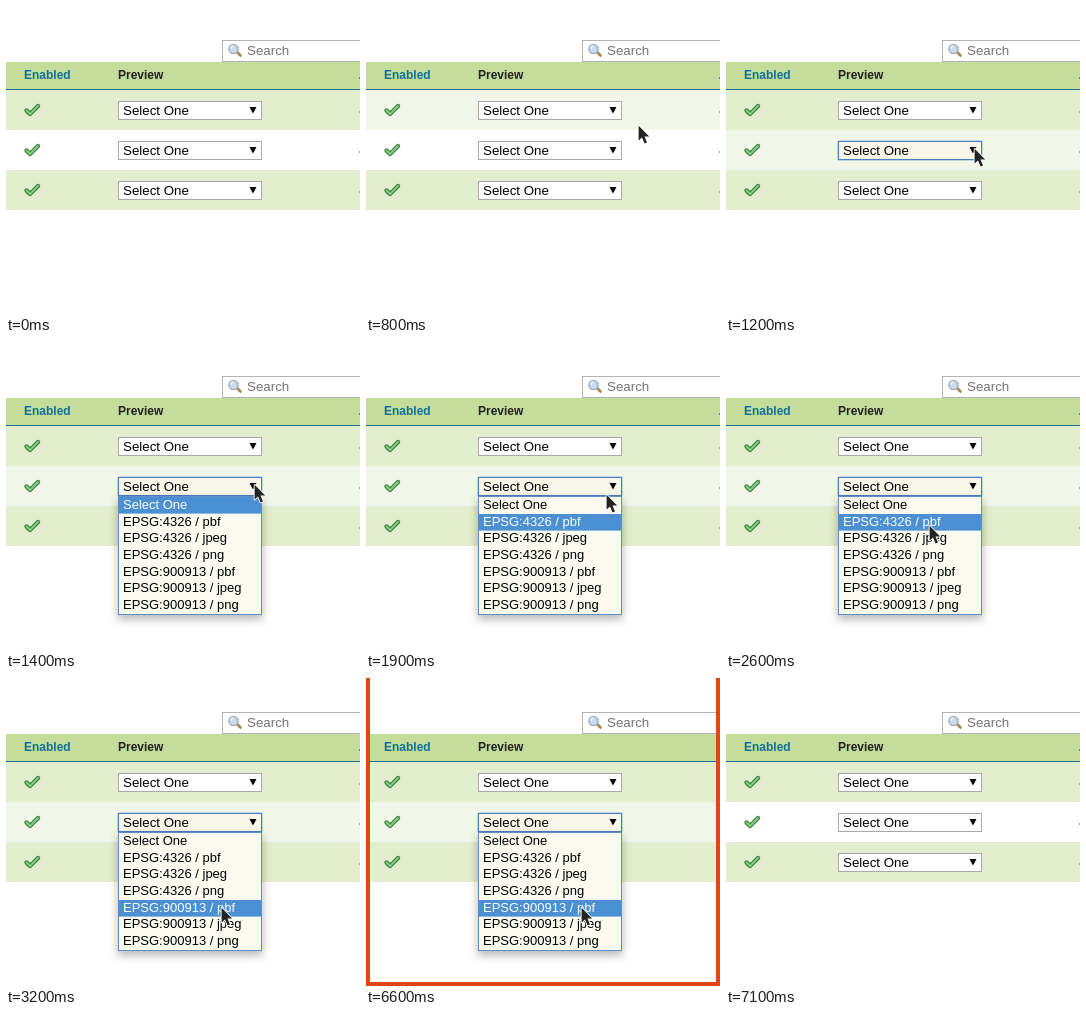
An HTML page that plays this animation: 354 px wide and 308 px high, repeating every 7.8 s.

```html
<!DOCTYPE html>
<html lang="en">
<head>
<meta charset="utf-8">
<title>Layer preview table</title>
<style>
  html, body { margin: 0; width: 100%; height: 100%; overflow: hidden; background: #fff; }
  svg { display: block; width: 354px; height: 308px; font: 13.333px "Liberation Sans", Arial, sans-serif; }
  .head { font-size: 12px; font-weight: bold; }
  .box { fill: #fff; stroke: #a9a9a9; }
  .focused .box { fill: #f9f7ea; stroke: #4a80c0; }
  .glow { fill: none; stroke: #4a80c0; stroke-opacity: .3; stroke-width: 3; visibility: hidden; }
  .focused .glow { visibility: visible; }
  #popup { font-size: 13px; }
  #panel { fill: #fbfaef; stroke: #5d8fc9; filter: drop-shadow(0 4px 5px rgba(0, 0, 0, .3)); }
</style>
</head>
<body>
<svg viewBox="0 0 354 308">
  <defs>
    <g id="tick" fill="none" stroke-linejoin="round" stroke-linecap="round">
      <path d="M20.5 20.5l3.5 3.5l8-8" stroke="#357d3a" stroke-width="4.4"/>
      <path d="M20.5 20.5l3.5 3.5l8-8" stroke="#83cc80" stroke-width="2.2"/>
    </g>
  </defs>

  <rect x="216.5" y="34.5" width="150" height="21" fill="#fff" stroke="#b4b4b4"/>
  <path d="M231 46l3.5 3.5" stroke="#b98245" stroke-width="2.6" stroke-linecap="round"/>
  <circle cx="227.5" cy="43" r="4.6" fill="#c5dcf0" stroke="#98a9b9" stroke-width="1.3"/>
  <path d="M225 42.5q.5-2 2.5-2.3" fill="none" stroke="#fff" stroke-width="1.2"/>
  <text x="241" y="49" fill="#757575">Search</text>

  <rect y="56" width="354" height="27" fill="#c4dd9b"/>
  <rect y="83" width="354" height="1" fill="#0a6e9c"/>
  <text class="head" x="18" y="73" fill="#0f6f9c">Enabled</text>
  <text class="head" x="112" y="73" fill="#222">Preview</text>
  <rect x="353" y="71" width="1" height="2" fill="#4f8f9c"/>

  <g id="rows"></g>

  <g id="popup">
    <rect id="panel" x="112.5" y="154.5" width="143" height="118"/>
    <rect id="highlight" x="113" width="142" height="16.6" fill="#4a90d2"/>
    <g id="options"></g>
  </g>

  <path id="cursor" d="M1.6 1.8V16.6L5 13.4L7.6 19.4L10 18.4L7.5 12.6H12.2Z"
        fill="#242424" stroke="#fff" stroke-width="1.8" stroke-linejoin="round" paint-order="stroke"/>
  <path id="frame" d="M2 0V306H352V0" fill="none" stroke="#de4814" stroke-width="4"/>
</svg>
<script>
const $ = id => document.getElementById(id);
const LOOP = 7800, ROW_TOP = 84, ROW_H = 40, OPTION_TOP = 155, OPTION_H = 16.67;
const ROW_COLORS = ['#e2eecd', '#ffffff', '#e2eecd'], HOVER = '#f2f6e8';
const OPTIONS = ['Select One'];
for (const code of ['4326', '900913'])
  for (const format of ['pbf', 'jpeg', 'png']) OPTIONS.push(`EPSG:${code} / ${format}`);

$('rows').innerHTML = ROW_COLORS.map((color, i) => `
  <g transform="translate(0 ${ROW_TOP + i * ROW_H})">
    <rect class="bg" width="354" height="${ROW_H}" fill="${color}"/>
    <use href="#tick"/>
    <rect class="glow" x="112.5" y="11.5" width="143" height="18" rx="1"/>
    <rect class="box" x="112.5" y="11.5" width="143" height="18"/>
    <text x="117" y="25">Select One</text>
    <path d="M243.5 17h7l-3.5 6.5z"/>
    <rect x="353" y="21" width="1" height="2" fill="#a9b3a0"/>
  </g>`).join('');
$('options').innerHTML = OPTIONS.map((label, i) =>
  `<text x="117" y="${Math.round(167 + i * OPTION_H)}">${label}</text>`).join('');

const rows = [...$('rows').children], options = [...$('options').children];

// Each step: start time, then the values held until the next step.
const CURSOR = [
  [500, 322, 78], [700, 304, 93], [800, 271, 118], [900, 249, 143], [1200, 247, 141],
  [1800, 245, 145], [1900, 239, 151], [2000, 231, 163], [2100, 221, 174], [2200, 211, 182],
  [2300, 206, 185], [2400, 203, 183], [2500, 202, 180], [2600, 202, 182], [2800, 203, 183],
  [3000, 206, 193], [3100, 212, 216], [3200, 214, 228], [6800, 214, 229]
];
const HIGHLIGHT = [[0, 0], [1900, 1], [2800, 2], [3000, 3], [3100, 4]];
const HOVERED = [[0, -1], [700, 0], [900, 1], [6800, -1]];
const FRAME = [[0, 0], [6600, 1], [6800, .5], [6900, 0]];

const at = (steps, t) => steps.findLast(step => step[0] <= t);
const show = (el, on) => el.setAttribute('visibility', on ? 'visible' : 'hidden');

function draw(t) {
  const [, x, y] = at(CURSOR, t) || CURSOR[0];
  $('cursor').setAttribute('transform', `translate(${x} ${y})`);
  show($('cursor'), t >= 500 && t < 7100);

  const hovered = at(HOVERED, t)[1];
  rows.forEach((row, i) =>
    row.querySelector('.bg').setAttribute('fill', i === hovered ? HOVER : ROW_COLORS[i]));
  rows[1].classList.toggle('focused', t >= 1200 && t < 6800);

  const selected = at(HIGHLIGHT, t)[1];
  show($('popup'), t >= 1400 && t < 6800);
  $('highlight').setAttribute('y', Math.round(OPTION_TOP + selected * OPTION_H));
  options.forEach((el, i) => el.setAttribute('fill', i === selected ? '#fff' : '#000'));

  $('frame').setAttribute('opacity', at(FRAME, t)[1]);
}

const start = performance.now();
function tick() {
  draw((performance.now() - start) % LOOP);
  requestAnimationFrame(tick);
}
tick();
</script>
</body>
</html>
```
